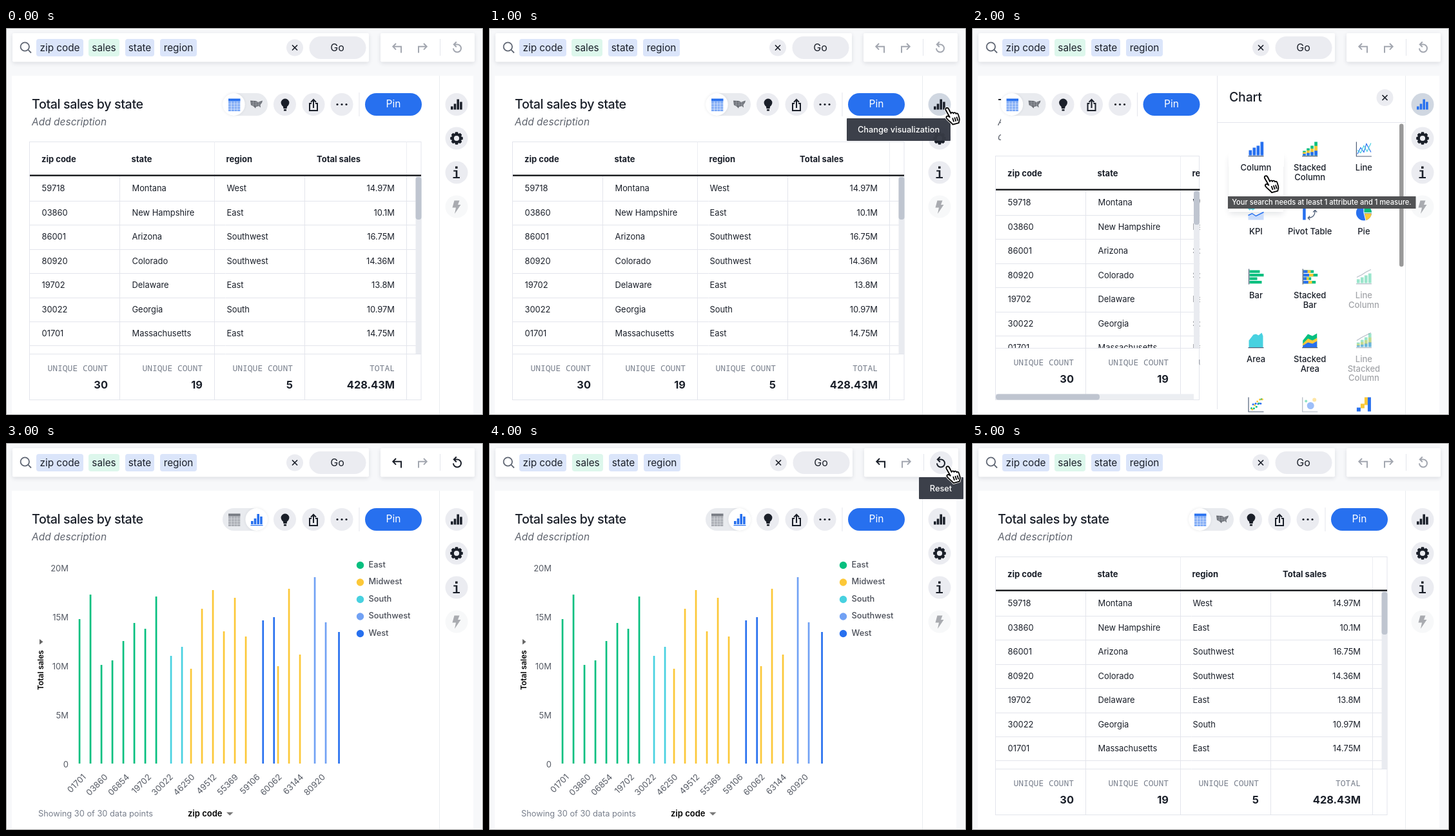
An HTML page with a canvas that plays this animation: 740x600 px, repeating every 6000 ms.

```html
<!DOCTYPE html>
<html lang="en">
<head>
<meta charset="utf-8">
<title>Table to chart and back</title>
<style>
html, body { margin: 0; width: 100%; height: 100%; overflow: hidden; background: #f7f8fa; }
canvas { display: block; width: 740px; height: 600px; }
</style>
</head>
<body>
<canvas id="stage"></canvas>
<script>
const canvas = document.getElementById('stage');
const g = canvas.getContext('2d');
const ratio = window.devicePixelRatio || 1;
canvas.width = 740 * ratio;
canvas.height = 600 * ratio;

const BLUE = '#2770ef', SKY = '#71a1f4', GREEN = '#06bf7f', YELLOW = '#fcc838', CYAN = '#48d1e0';
const INK = '#1a1f29', MUTED = '#777e8b', PALE = '#ebecf1', LINE = '#e3e5ec', OFF = '#a3a7b0', AXIS = '#4f5f79';
const SANS = 'Inter, sans-serif', MONO = '"Noto Sans Mono", monospace';

// Drawing helpers
function rect(x, y, w, h, fill, radius = 0) {
  g.fillStyle = fill;
  g.beginPath();
  g.roundRect(x, y, w, h, radius);
  g.fill();
}
function disc(x, y, r, fill) {
  g.fillStyle = fill;
  g.beginPath();
  g.arc(x, y, r, 0, 7);
  g.fill();
}
function fillPath(d, fill) {
  g.fillStyle = fill;
  g.fill(new Path2D(d));
}
function strokePath(d, color, width = 1) {
  g.strokeStyle = color;
  g.lineWidth = width;
  g.stroke(new Path2D(d));
}
function text(str, x, y, size, { weight = 400, color = INK, align = 'left', family = SANS, italic = '', tracking = 0 } = {}) {
  g.font = `${italic} ${weight} ${size}px ${family}`;
  g.letterSpacing = tracking * size + 'px';
  g.fillStyle = color;
  g.textAlign = align;
  g.fillText(str, x, y);
}
function group(x, y, draw, angle = 0) {
  g.save();
  g.translate(x, y);
  g.rotate(angle);
  draw();
  g.restore();
}
function clipped(x, y, w, h, draw) {
  g.save();
  g.beginPath();
  g.rect(x, y, w, h);
  g.clip();
  draw();
  g.restore();
}
function shadowed(blur, dy, color, draw) {
  g.save();
  g.shadowColor = color;
  g.shadowBlur = blur * ratio;
  g.shadowOffsetY = dy * ratio;
  draw();
  g.restore();
}

// Shared parts
function closeButton(x, y) {
  disc(x, y, 13, PALE);
  group(x, y, () => strokePath('M-4-4 4 4M4-4-4 4', INK, 1.7));
}
function columns(color, baseline) {
  [5, 9, 16, 12].forEach((h, i) => rect(-9 + i * 4.7, 8 - h, 3.6, h, color));
  if (baseline) rect(-9.5, 9, 19, 1.2, color);
}
function gridIcon(x, y, head, cell) {
  rect(x - 9, y - 9.5, 18.5, 4, head);
  for (let r = 0; r < 6; r++)
    for (let c = 0; c < 4; c++) rect(x - 9 + c * 4.7, y - 5 + r * 2.6, 4.2, 2, cell);
}
function tooltip(str, x, y, w, h, center) {
  rect(x, y, w, h, 'rgba(54,58,69,.97)', 1);
  text(str, center, y + 21.5, 12.8, { weight: 500, color: '#fff', align: 'center' });
}
function pointer(x, y) {
  group(x, y, () => {
    const hand = 'M.9 3.5C-.2.3 4-1.1 5.6 2L9.2 9C9.4 6.9 12.2 6.7 13 9 13.7 7 16.3 7.2 17 9.4 18 8.2 20 8.9 20.5 10.8L22.2 16.5C23 19.6 21.4 21.2 21.4 23.6L12 26.2C10.5 23.2 5 20.4 2.2 16.2 1 13.5 4 12 6.2 13.8L7.3 14.7Z';
    g.lineJoin = 'round';
    strokePath(hand, '#fff', 3.6);
    fillPath(hand, '#fff');
    strokePath(hand + 'M11.6 16 13.6 22M14.8 15 16.8 21.2M18 14.2 19.8 20.2', '#000', 1.8);
  });
}

// Search and history bar
function topBar(hasHistory, resetHover) {
  const dx = resetHover ? 1 : 0;
  shadowed(6, 2, 'rgba(30,40,60,.13)', () => {
    rect(10, 8, 553 + dx, 44.5, '#fff', 2);
    rect(581 + dx, 8, 146, 44.5, '#fff', 2);
  });
  strokePath('M36 29A6.7 6.7 0 1 0 22.6 29 6.7 6.7 0 1 0 36 29M34.2 33.7 39 38.5', '#5f6673', 1.8);
  const chips = [['zip code', 47, 73], ['sales', 128, 48], ['state', 185, 45], ['region', 239, 57]];
  chips.forEach(([label, x, w], i) => {
    x += i ? dx : 0;
    rect(x, 17, w, 27, i === 1 ? '#ddf7ec' : '#dbe5fa', 4);
    text(label, x + w / 2, 36, 15.3, { align: 'center' });
  });
  group(dx, 0, () => {
    closeButton(448, 30.5);
    rect(470.5, 13, 88, 35, PALE, 17.5);
    text('Go', 514, 35.5, 16, { align: 'center' });
    const active = hasHistory ? INK : OFF;
    strokePath('M613 38.5V28.8H601M605 24 600.3 28.8 605 33.6', active, 2);
    strokePath('M640 38.5V28.8H652M648 24 652.7 28.8 648 33.6', OFF, 2);
    strokePath('M673.5 17V43', LINE);
    if (resetHover) disc(700.5, 30.5, 17.5, PALE);
    strokePath('M696 25.5H700A6 6 0 1 1 694 31.5M698.8 21.5 694.8 25.5 698.8 29.5', active, 2);
  });
}

function toolbar(dx, isChart) {
  group(dx, 0, () => {
    rect(336, 101, 70, 35, '#e9ebef', 17.5);
    shadowed(4, 0, 'rgba(30,40,60,.09)', () => disc(isChart ? 388.8 : 353.3, 118.5, 17.4, '#fff'));
    if (isChart) {
      gridIcon(354, 119, '#777b83', '#a4a7ae');
      group(389, 118, () => columns(BLUE, true));
    } else {
      gridIcon(354, 119, BLUE, SKY);
      fillPath('M379 112.5 388 113 391 115 398 112.5 397 116 394.5 119 395 123.5 392.5 121 388 122 387 124.5 384 121.5 380 119.5Z', '#6b6f76');
      strokePath('M379 116H396M381 119H394M383.5 113V121M388 113V121M392 115V121', '#a9acb2', .6);
    }
    [432.5, 477, 521].forEach(x => disc(x, 118.5, 17.5, PALE));
    disc(433, 116, 6.4, INK);
    fillPath('M429.5 120H436.5L435.5 125H430.5ZM431 126H435V128.5H431Z', INK);
    strokePath('M474 117H471V128H483V117H480M477 124V111.5M473 115 477 111 481 115', INK, 2);
    [514, 521, 528].forEach(x => disc(x, 118.5, 1.6, INK));
    strokePath('M548 100V137', LINE);
    rect(557, 101, 88, 35, BLUE, 17.5);
    text('Pin', 601, 123, 15.5, { color: '#fff', align: 'center' });
  });
}

function sidebar(chartFill, chartInk) {
  strokePath('M672.5 74V600', '#eaecf0');
  [118.5, 171, 224, 277].forEach((y, i) => disc(699, y, 17.5, [chartFill, PALE, PALE, '#f7f8f9'][i]));
  group(699, 118.5, () => columns(chartInk));
  group(699, 171, () => {
    for (let i = 0; i < 8; i++) group(0, 0, () => rect(-2.3, -9.8, 4.6, 5, INK, 1), i * Math.PI / 4);
    g.beginPath();
    g.arc(0, 0, 6.1, 0, 7);
    g.strokeStyle = INK;
    g.lineWidth = 4;
    g.stroke();
  });
  fillPath('M697 214.5H700.6V218H697ZM694.3 220.5H700.3V231H704V233H693.5V231H697.7V222.5H694.3Z', INK);
  fillPath('M695.5 267.5H703.5L701 274H705.5L696 288 698 278.5H692.5Z', '#a9abb0');
}

function heading(narrow) {
  const title = { weight: 500, tracking: -.02 };
  const note = { italic: 'italic', color: '#5f646e' };
  if (narrow) {
    clipped(40, 90, 5, 100, () => {
      text('Total', 40, 125, 19.7, title);
      text('Add', 40, 151, 15.5, note);
      text('description', 40, 174, 15.5, note);
    });
  } else {
    text('Total sales by state', 40, 125, 19.7, title);
    text('Add description', 40, 151, 15.5, note);
  }
}

const ROWS = [
  ['59718', 'Montana', 'West', '14.97M'],
  ['03860', 'New Hampshire', 'East', '10.1M'],
  ['86001', 'Arizona', 'Southwest', '16.75M'],
  ['80920', 'Colorado', 'Southwest', '14.36M'],
  ['19702', 'Delaware', 'East', '13.8M'],
  ['30022', 'Georgia', 'South', '10.97M'],
  ['01701', 'Massachusetts', 'East', '14.75M']
];

function table(narrow) {
  const dy = narrow ? 22 : 0, right = narrow ? 353 : 644.5;
  const foot = narrow ? 496 : 505, top = 176.5 + dy;
  clipped(36, top - 1, right - 35.5, 402, () => {
    g.strokeStyle = LINE;
    g.lineWidth = 1;
    g.strokeRect(36.5, top, right - 37, 576.5 - top);
    strokePath(`M323.5 ${top}V${top + 52}M621.5 ${top}V${top + 52}`, '#eceef2');
    ['zip code', 'state', 'region', 'Total sales'].forEach((label, i) =>
      text(label, [55, 194.5, 341.5, 482][i], 208 + dy, 13, { weight: 700 }));
    clipped(36, top + 50, 610, foot - top - 50, () => ROWS.forEach((row, i) => {
      row.forEach((cell, c) => text(cell, [55.5, 195.5, 342.5, 603][c], 253.3 + dy + i * 37.5, 12.9, { align: c === 3 ? 'right' : 'left' }));
      const y = Math.round(268 + dy + i * 37.4) + .5;
      strokePath(`M37 ${y}H644`, LINE);
    }));
    strokePath([176.5, 323.5, 463.5, 621.5].map(x => `M${x} ${top + 53}V576`).join(''), LINE);
    strokePath(`M37 ${foot}.5H644`, LINE);
    rect(37, 227.6 + dy, 607, 2.1, '#090b0e');
    ['30', '19', '5', '428.43M'].forEach((total, i) => {
      const x = [158, 305, 445, 603][i], y = foot + 26.5;
      text(i < 3 ? 'UNIQUE COUNT' : 'TOTAL', x, y, 13, { family: MONO, color: MUTED, align: 'right' });
      text(total, x, y + 27, 16.4, { weight: 700, align: 'right' });
    });
    rect(right - 9, 230 + dy, 9, foot - 230 - dy, '#e9ebf0');
    rect(right - 9, 231 + dy, 9, narrow ? 52 : 66, '#bfc5d0', 4);
    if (narrow) {
      rect(37, 567.5, 307, 9, '#eceef2');
      rect(37, 567.5, 161, 9, '#bfc5d0', 4);
    }
  });
}

// Each run: color, first x, then the tops of bars 17 px apart
const RUNS = [
  [GREEN, 114, 273, 235, 344, 337, 307, 279, 288, 238],
  [CYAN, 256, 330, 316],
  [YELLOW, 287, 350, 257, 228, 292, 240, 300],
  [BLUE, 398.7, 275, 270],
  [YELLOW, 422, 346, 226, 328],
  [SKY, 479, 208, 278],
  [BLUE, 516.5, 293]
];
const ZIPS = '01701 03860 06854 19702 30022 46250 49512 55369 59106 60062 63144 80920'.split(' ');
const REGIONS = [['East', GREEN], ['Midwest', YELLOW], ['South', CYAN], ['Southwest', SKY], ['West', BLUE]];

function chart() {
  ['20M', '15M', '10M', '5M', '0'].forEach((label, i) =>
    text(label, 97, 198.7 + i * 76.1, 13, { align: 'right', color: '#555a64' }));
  RUNS.forEach(([color, x, ...tops]) => tops.forEach((y, i) => rect(x + i * 17 - 1.3, y, 2.7, 497 - y, color)));
  ZIPS.forEach((zip, i) => group(121.5 + i * 33.75, 515.5, () =>
    text(zip, 0, 4.6, 13, { align: 'right', color: '#555a64' }), -Math.PI / 4));
  group(58, 383, () => text('Total sales', 0, 0, 12, { weight: 600, color: '#000' }), -Math.PI / 2);
  fillPath('M52 304 57.5 308.3 52 312.5Z', '#666');
  text('Showing 30 of 30 data points', 50, 579, 12.8, { color: MUTED });
  text('zip code', 282, 578.5, 13, { weight: 600, color: '#000' });
  fillPath('M342 572.5H352.5L347.2 577.5Z', '#777');
  REGIONS.forEach(([name, color], i) => {
    disc(549.5, 189.5 + i * 26.5, 5.7, color);
    text(name, 562.5, 192.5 + i * 26.5, 12.8, { weight: 500, color: '#4a4e58' });
  });
}

// Chart type icons, drawn around the origin in a 24 px box
const axes = () => strokePath('M-11.5-11V11.5H12', AXIS, 1.2);
function stackedColumns() {
  [7, 11, 15, 21].forEach((h, i) => {
    const x = -11 + i * 6;
    rect(x, 10 - h, 4.7, h, GREEN);
    rect(x, 10 - h * .7, 4.7, h * .4, YELLOW);
    rect(x, 10 - h * .35, 4.7, h * .35, BLUE);
  });
  rect(-12, 10.5, 24, 1.2, AXIS);
}
const HORIZONTAL = [16, 22, 12, 19];
const ICONS = {
  'Column': () => {
    [8, 12, 15, 21].forEach((h, i) => rect(-11 + i * 6, 10 - h, 4.7, h, BLUE));
    rect(-12, 10.5, 24, 1.2, AXIS);
  },
  'Stacked|Column': stackedColumns,
  'Line': () => {
    axes();
    strokePath('M-10 8-5-2 0 5 4-8 11 5', BLUE, 1.2);
    strokePath('M-10 2-5 6 0-5 5 4 11-9', CYAN, 1.2);
  },
  'KPI': () => {
    strokePath('M-10-4-8-12M-5-4-3-12M-12-10H-2M-12-6H-2', CYAN, 1.3);
    fillPath('M-12 4-6 1 0 5 12-1V11H-12Z', '#c9dcfb');
    strokePath('M-12 4-6 1 0 5 12-1', BLUE, 1.5);
  },
  'Pivot Table': () => {
    rect(-11, -11, 4.5, 22, BLUE);
    rect(-4, -11, 15, 4.5, SKY);
    strokePath('M-3 8Q8 8 8-4M5-1 8-4 11-1M0 5-3 8 0 11', AXIS, 1.3);
  },
  'Pie': () => {
    disc(0, 0, 12, BLUE);
    fillPath('M0 0V-12A12 12 0 0 1 12 0Z', GREEN);
    fillPath('M1 1H12A12 12 0 0 1 3 11.8Z', YELLOW);
    strokePath('M0-12V0H12M0 0 3 12', '#fff', 1);
  },
  'Bar': () => {
    HORIZONTAL.forEach((w, i) => rect(-10, -10 + i * 5.5, w, 4.3, GREEN));
    rect(-11.5, -12, 1.2, 24, AXIS);
  },
  'Stacked|Bar': () => {
    HORIZONTAL.forEach((w, i) => {
      const y = -10 + i * 5.5;
      rect(-10, y, w, 4.3, GREEN);
      rect(-10, y, w * .7, 4.3, YELLOW);
      rect(-10, y, w * .4, 4.3, BLUE);
    });
    rect(-11.5, -12, 1.2, 24, AXIS);
  },
  'Line|Column': () => {
    [6, 9, 12, 15].forEach((h, i) => rect(-11 + i * 6, 10 - h, 4.7, h, GREEN));
    strokePath('M-11 1-3-3 3-7 11-11', AXIS, 1.2);
    rect(-12, 10.5, 24, 1.2, AXIS);
  },
  'Area': () => {
    fillPath('M-11 11V0L-4-9 0-10 4-8 9-12 11-7V11Z', CYAN);
    rect(-12, 10.5, 24, 1.2, AXIS);
  },
  'Stacked|Area': () => {
    fillPath('M-11 11V0L-3-10 4-7 11-11V11Z', GREEN);
    fillPath('M-11 11V5L-3-3 4 0 11-4V11Z', YELLOW);
    fillPath('M-11 11V8L-3 3 4 5 11 1V11Z', BLUE);
    rect(-12, 10.5, 24, 1.2, AXIS);
  },
  'Line|Stacked|Column': () => {
    stackedColumns();
    strokePath('M-11 0-3-5 3-8 11-12', AXIS, 1.2);
  },
  'Scatter': () => {
    axes();
    for (let i = 0; i < 14; i++)
      disc(-7 + i * 1.3, 6 - i + Math.sin(i * 2.4) * 4, 1.5, [GREEN, YELLOW, BLUE][i % 3]);
  },
  'Bubble': () => {
    axes();
    disc(1, 2, 5.5, BLUE);
    disc(7, -7, 3, YELLOW);
    disc(-6, -5, 2, GREEN);
  },
  'Waterfall': () => {
    rect(-11, 5, 6, 6, BLUE);
    rect(-5, -1, 6, 7, YELLOW);
    rect(1, -11, 5, 12, YELLOW);
    rect(6, -11, 5, 22, BLUE);
  }
};
const FADED = { 'Line|Column': .4, 'Line|Stacked|Column': .4, 'Bubble': .45 };

function chartPicker() {
  strokePath('M380.5 74V591M381 146.5H672', LINE);
  text('Chart', 399, 114, 19.5, { weight: 500, tracking: -.01 });
  closeButton(640.5, 108);
  rect(663, 148.5, 6.5, 221.5, '#999', 3.2);
  shadowed(9, 3, 'rgba(30,40,60,.13)', () => rect(398.5, 198, 84.5, 87, '#fff'));
  rect(398, 165, 86, 50, '#fff');
  Object.entries(ICONS).forEach(([name, draw], i) => {
    const x = 440.5 + i % 3 * 83.7, y = 187.5 + Math.floor(i / 3) * 99;
    g.save();
    g.globalAlpha = FADED[name] || 1;
    clipped(x - 40, y - 20, 80, Math.min(100, 616 - y), () => group(x, y, draw));
    if (i < 12) name.split('|').forEach((word, n) =>
      text(word, x, y + 33.5 + n * 14.5, 13, { weight: 500, align: 'center' }));
    g.restore();
  });
}
function searchHint() {
  rect(397, 261, 291.5, 19, '#515254');
  text('Your search needs at least 1 attribute and 1 measure.', 542.5, 274.3, 11.1, { weight: 500, color: '#fff', align: 'center' });
}

function draw(step) {
  const isChart = step === 3 || step === 4, picking = step === 2;
  g.setTransform(ratio, 0, 0, ratio, 0, 0);
  rect(0, 0, 740, 600, '#f7f8fa');
  topBar(isChart, step === 4);
  rect(9, 74, 716, 526, '#fff');
  heading(picking);
  toolbar(picking ? -291.5 : 0, isChart);
  if (isChart) chart();
  else table(picking);
  if (picking) chartPicker();
  sidebar(picking || step === 1 ? '#d0d7e1' : PALE, picking ? BLUE : INK);

  if (step === 1) {
    tooltip('Change visualization', 555, 140, 161, 35, 635.5);
    pointer(707.5, 123.5);
  } else if (picking) {
    searchHint();
    pointer(453, 229);
  } else if (step === 4) {
    tooltip('Reset', 667, 53, 69, 34, 701);
    pointer(708.5, 36);
  }
  g.strokeStyle = '#9a9a9a';
  g.lineWidth = 1;
  g.strokeRect(.5, .5, 739, 599);
}

const start = performance.now();
function tick() {
  draw(Math.floor((performance.now() - start) / 1000) % 6);
  requestAnimationFrame(tick);
}
tick();
</script>
</body>
</html>
```
